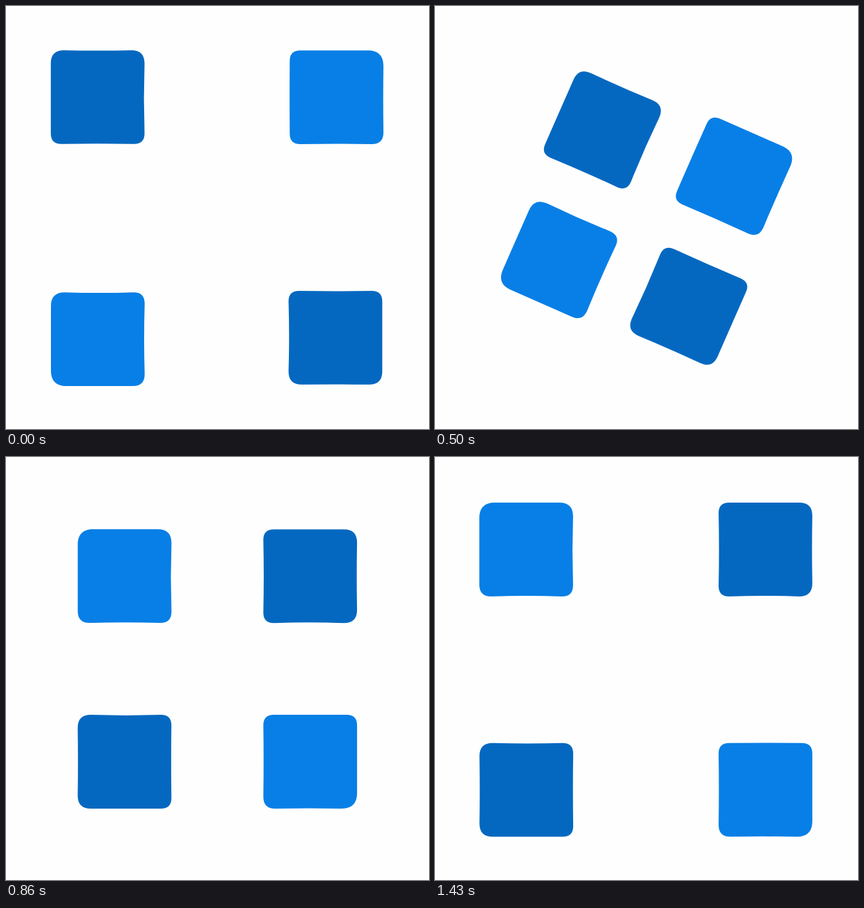
Animation of 640 by 640 pixels, one loop 2 s. Source, as an HTML page:

```html
<!DOCTYPE html>
<html lang="en">
<head>
<meta charset="utf-8">
<title>Four tiles</title>
<style>
  html, body { margin: 0; width: 100%; height: 100%; overflow: hidden; background: #fefefe; }
  svg { display: block; width: 100%; height: 100%; }
</style>
</head>
<body>
<svg id="stage" viewBox="0 0 640 640"></svg>
<script>
const LOOP = 2000, FPS = 14, LAST = 20, HALF = 70.9;
const DARK = '#0568c0', LIGHT = '#087fe6';
const CENTER = [320, 320.5];

// Clockwise from top left. r: corner radii; bow: inward bend of top, right, bottom, left.
// start, near, turned, end: centre positions between the phases.
const tiles = [
  { fill: DARK, r: [20, 20, 16, 16], bow: [.5, .9, .6, 0],
    start: [138.7, 137.9], near: [177.1, 182], turned: [458.3, 182.3], end: [500, 140] },
  { fill: LIGHT, r: [16, 24, 18, 16], bow: [0, .4, .4, -.2],
    start: [500.2, 138.1], near: [458.4, 182.4], turned: [458.3, 458.9], end: [500, 503.6] },
  { fill: DARK, r: [16, 16, 20, 20], bow: [.4, 0, .4, .8],
    start: [498.4, 501.9], near: [459, 460], turned: [181.4, 458.9], end: [138.2, 503.6] },
  { fill: LIGHT, r: [21, 17, 18, 24], bow: [.9, .8, 0, 0],
    start: [138.9, 504.1], near: [182, 459.4], turned: [181.5, 182], end: [138, 140] }
];

const lerp = (a, b, t) => a.map((v, i) => v + (b[i] - v) * t);
const span = (n, from, to) => Math.min(1, Math.max(0, (n - from) / (to - from)));
const ease = (t, soft) => t - soft * Math.sin(2 * Math.PI * t);

function outline({ r, bow }) {
  // Each side is laid out along the top, then turned by quarter steps.
  const at = (x, y, side) => {
    for (; side > 0; side--) [x, y] = [-y, x];
    return x.toFixed(2) + ' ' + y.toFixed(2);
  };
  let d = 'M' + at(r[0] - HALF, -HALF, 0);
  for (let i = 0; i < 4; i++) {
    const a = r[i], b = r[(i + 1) % 4], k = b * .32;
    d += `Q${at((a - b) / 2, 2 * bow[i] - HALF, i)} ${at(HALF - b, -HALF, i)}`;
    d += `C${at(HALF - k, -HALF, i)} ${at(HALF, k - HALF, i)} ${at(HALF, b - HALF, i)}`;
  }
  return d + 'Z';
}

function pose(tile, n) {
  if (n <= 5) return lerp(tile.start, tile.near, ease(span(n, 0, 4.4), .04));
  if (n >= 11) return lerp(tile.turned, tile.end, ease(span(n, 11, LAST), .1));
  const t = span(n, 5, 11);
  const pull = .041 * Math.sin(Math.PI * t);
  return lerp(lerp(tile.near, tile.turned, ease(t, .08)), CENTER, pull);
}

const stage = document.getElementById('stage');
for (const tile of tiles) {
  tile.el = document.createElementNS(stage.namespaceURI, 'path');
  tile.el.setAttribute('d', outline(tile));
  tile.el.setAttribute('fill', tile.fill);
  stage.append(tile.el);
}

// Motion runs on a fixed step, rounded to 10 ms.
function stepAt(ms) {
  let n = 0;
  while (n < LAST && Math.round((n + 1) * 100 / FPS) * 10 <= ms) n++;
  return n;
}

function draw(ms) {
  const n = stepAt(ms % LOOP);
  const angle = 90 * ease(span(n, 5, 11), .08);
  for (const tile of tiles) {
    const [x, y] = pose(tile, n);
    tile.el.setAttribute('transform', `translate(${x} ${y}) rotate(${angle})`);
  }
}

const begin = performance.now();
function tick(now) {
  draw(Math.max(0, now - begin));
  requestAnimationFrame(tick);
}
tick(begin);
</script>
</body>
</html>
```
